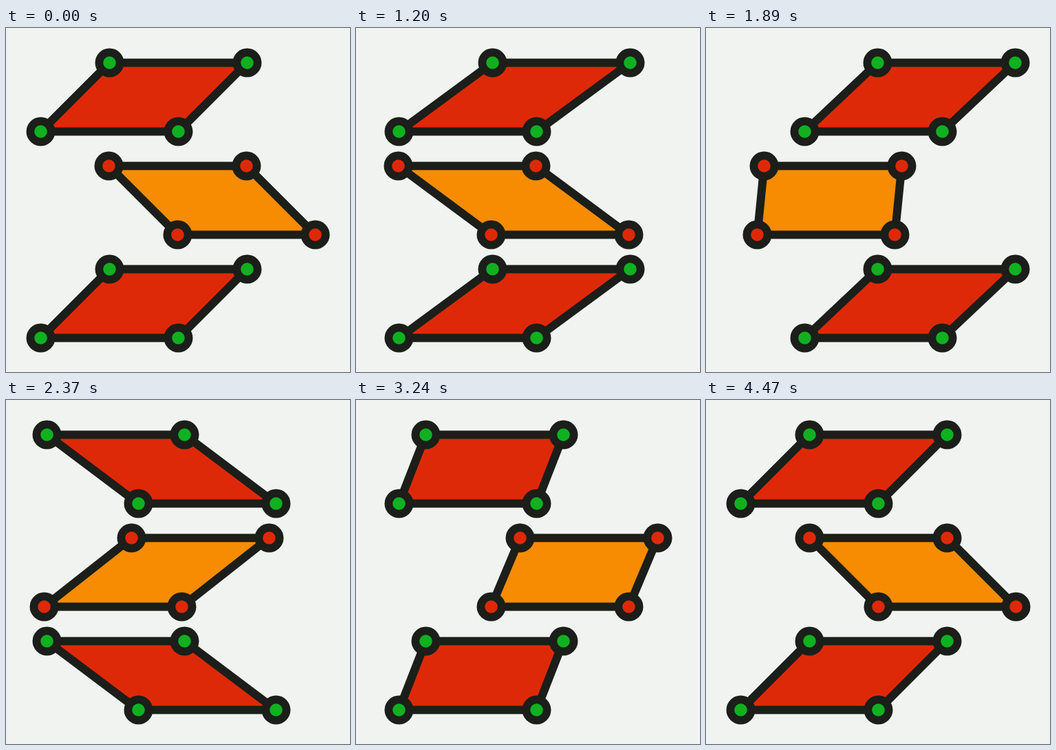
An HTML page that plays this animation: 500 by 500 pixels, repeating every 4.5 s.

```html
<!DOCTYPE html>
<html lang="en">
<head>
<meta charset="utf-8">
<title>Eased parallelograms</title>
<style>
  html, body { margin: 0; width: 100%; height: 100%; overflow: hidden; background: #f1f3f0; }
  svg { display: block; width: 100%; height: 100%; }
  polygon { stroke: #1b1e19; stroke-width: 12; stroke-linejoin: round; }
  .rim { fill: #1b1e19; }
  .circ { fill: #de2908; --dot: #10b021; }
  .sine { fill: #f78c02; --dot: #de2908; }
  .dot { fill: var(--dot); }
</style>
</head>
<body>
<svg viewBox="0 0 500 500"></svg>
<script>
const TAU = 2 * Math.PI, STEP = 30, STEPS = 150, WIDTH = 200;
const svg = document.querySelector('svg');

const easeSine = u => (1 - Math.cos(Math.PI * u)) / 2;
const easeCirc = u => u < 0.5
  ? (1 - Math.sqrt(1 - 4 * u * u)) / 2
  : (1 + Math.sqrt(1 - 4 * (1 - u) * (1 - u))) / 2;

function add(parent, tag, attrs) {
  const el = document.createElementNS('http://www.w3.org/2000/svg', tag);
  for (const k in attrs) el.setAttribute(k, attrs[k]);
  return parent.appendChild(el);
}

// Edges swing a quarter turn apart; dir mirrors the swing.
function makeRow(y, ease, dir, cls) {
  const g = add(svg, 'g', { class: cls });
  const poly = add(g, 'polygon', {});
  const knobs = [0, 1, 2, 3].map(() => {
    const k = add(g, 'g', {});
    add(k, 'circle', { r: 21, class: 'rim' });
    add(k, 'circle', { r: 9.3, class: 'dot' });
    return k;
  });
  return u => {
    const a = TAU * ease(u);
    const snap = v => Math.floor(150 + 100 * dir * v + 1e-9) + 0.5;
    const top = snap(Math.sin(a)), low = snap(-Math.cos(a));
    const y1 = y + 0.5, y2 = y + 100.5;
    const pts = [[top, y1], [top + WIDTH, y1], [low + WIDTH, y2], [low, y2]];
    poly.setAttribute('points', pts.join(' '));
    pts.forEach((p, i) => knobs[i].setAttribute('transform', `translate(${p})`));
  };
}

const rows = [
  makeRow(50, easeCirc, 1, 'circ'),
  makeRow(200, easeSine, -1, 'sine'),
  makeRow(350, easeCirc, 1, 'circ')
];

function draw(ms) {
  const u = (Math.floor(ms / STEP) % STEPS + 1) / STEPS;
  rows.forEach(row => row(u));
}

const start = performance.now();
function tick() {
  draw(performance.now() - start);
  requestAnimationFrame(tick);
}
draw(0);
requestAnimationFrame(tick);
</script>
</body>
</html>
```
